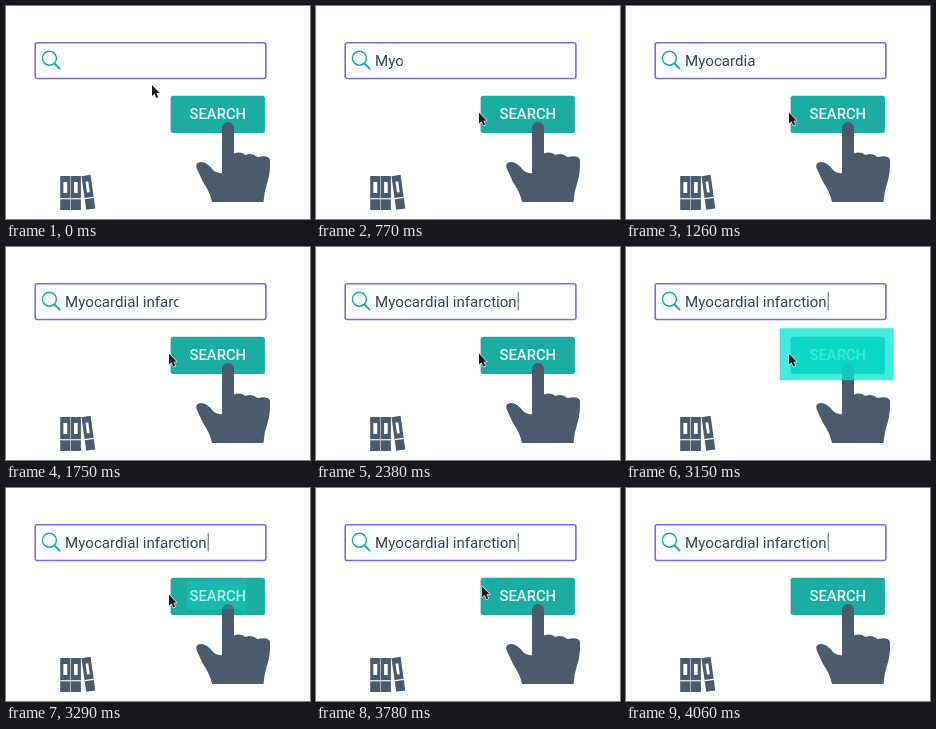
Animation, 304 px wide and 213 px high, one loop 4.48 s. Source, as an HTML page with a canvas:

```html
<!DOCTYPE html>
<html lang="en">
<head>
<meta charset="utf-8">
<title>Search</title>
<style>
html, body { margin: 0; width: 100%; height: 100%; overflow: hidden; background: #fff; }
canvas { display: block; width: 304px; height: 213px; }
</style>
</head>
<body>
<canvas id="stage"></canvas>
<script>
const W = 304, H = 213, LOOP = 4480, STEP = 70;
const TEAL = '#1bada1', SLATE = '#4b5b6b';
const canvas = document.getElementById('stage');
const ctx = canvas.getContext('2d');
const ratio = window.devicePixelRatio || 1;
canvas.width = Math.round(W * ratio);
canvas.height = Math.round(H * ratio);

const hand = new Path2D('M216 122a6 6 0 0 1 12 0V147.5Q234 145 239.5 149Q246 146.5 251.5 151' +
  'Q262 148.5 264 153.5Q264.5 167 261.5 176Q258 186 257.5 196H206Q204 186 197 176L190.5 162' +
  'Q189 156 195 156Q201 156 207 164Q211 168 216 167Z');
const arrow = new Path2D('M0 0V11L2.5 8.8L4.4 13L6.3 12.2L4.4 8.1H7.6Z');

const clamp = u => Math.max(0, Math.min(1, u));
const ease = u => 0.5 - 0.5 * Math.cos(Math.PI * clamp(u));
const mix = (a, b, u) => a + (b - a) * u;

// Linear track through rows of [time, ...values].
function track(t, rows) {
  let i = 1;
  while (i < rows.length - 1 && t > rows[i][0]) i++;
  const a = rows[i - 1], b = rows[i];
  const u = clamp((t - a[0]) / (b[0] - a[0]));
  return a.slice(1).map((v, k) => mix(v, b[k + 1], u));
}

function roundRect(x, y, w, h, r) {
  ctx.beginPath();
  ctx.roundRect(x, y, w, h, r);
}

function label(str, x, y, font, color, align) {
  ctx.font = `${font} Roboto, "Open Sans", sans-serif`;
  ctx.textAlign = align;
  ctx.fillStyle = color;
  ctx.fillText(str, x, y);
}

function drawField(t) {
  ctx.strokeStyle = '#7b6bd8';
  ctx.lineWidth = 1.6;
  roundRect(29.2, 36.8, 230.7, 35.7, 2);
  ctx.stroke();

  ctx.strokeStyle = TEAL;
  ctx.lineWidth = 1.5;
  ctx.beginPath();
  ctx.arc(43.4, 52.2, 7, 0, Math.PI * 2);
  ctx.stroke();
  ctx.lineWidth = 2;
  ctx.lineCap = 'round';
  ctx.beginPath();
  ctx.moveTo(48.6, 57.5);
  ctx.lineTo(53.6, 62.6);
  ctx.stroke();

  const edge = mix(59, 204, ease((t - 70) / 2430));
  ctx.save();
  ctx.beginPath();
  ctx.rect(58, 40, edge - 58, 30);
  ctx.clip();
  label('Myocardial infarction', 59.1, 59.8, '400 15.1px', '#36434f', 'left');
  ctx.fillStyle = '#5a636c';
  ctx.fillRect(201.7, 45, 1, 18.5);
  ctx.restore();
}

function drawButton() {
  ctx.fillStyle = TEAL;
  roundRect(164.6, 89.7, 94.3, 37.3, 2.5);
  ctx.fill();
  label('SEARCH', 211.8, 113.4, '500 14.8px', '#e8fbf8', 'center');
}

function drawBook(x, w) {
  ctx.fillStyle = SLATE;
  ctx.fillRect(x, 170, w, 34);
  ctx.fillStyle = '#fff';
  ctx.fillRect(x + 3.2, 176, w - 6.4, 11);
  ctx.fillRect(x, 192.2, w, 1.1);
}

function drawBooks() {
  drawBook(54.2, 10.2);
  drawBook(64.9, 10);
  ctx.save();
  ctx.translate(80.2, 203.8);
  ctx.rotate(-0.14);
  ctx.translate(0, -204);
  drawBook(0, 9.2);
  ctx.restore();
}

function drawPulse(t) {
  if (t < 2800 || t >= 3430) return;
  const [w, h, alpha] = track(t, [
    [2730, 92, 36, 0], [2870, 103, 44, 0.4], [3150, 114, 52, 0.76],
    [3290, 60, 28, 0.24], [3430, 36, 16, 0]
  ]);
  ctx.fillStyle = `rgba(5, 230, 210, ${alpha})`;
  ctx.fillRect(210.7 - w / 2, 107.2 - h / 2, w, h);
}

function drawCursor(t) {
  if (t >= 4060) return;
  const come = ease(t / 560), leave = ease((t - 3710) / 300);
  ctx.save();
  ctx.translate(mix(mix(146, 163, come), 187, leave), mix(mix(79, 106.6, come), 41, leave));
  ctx.lineWidth = 1.2;
  ctx.lineJoin = 'round';
  ctx.strokeStyle = '#fff';
  ctx.stroke(arrow);
  ctx.fillStyle = '#1a1a1a';
  ctx.fill(arrow);
  ctx.restore();
}

function draw(now) {
  const t = Math.floor((now % LOOP) / STEP) * STEP;
  ctx.setTransform(ratio, 0, 0, ratio, 0, 0);
  ctx.fillStyle = '#fff';
  ctx.fillRect(0, 0, W, H);
  drawField(t);
  drawButton();
  drawBooks();
  ctx.fillStyle = SLATE;
  ctx.fill(hand);
  drawPulse(t);
  drawCursor(t);
}

const start = performance.now();
function loop() {
  draw(performance.now() - start);
  requestAnimationFrame(loop);
}
loop();
</script>
</body>
</html>
```
